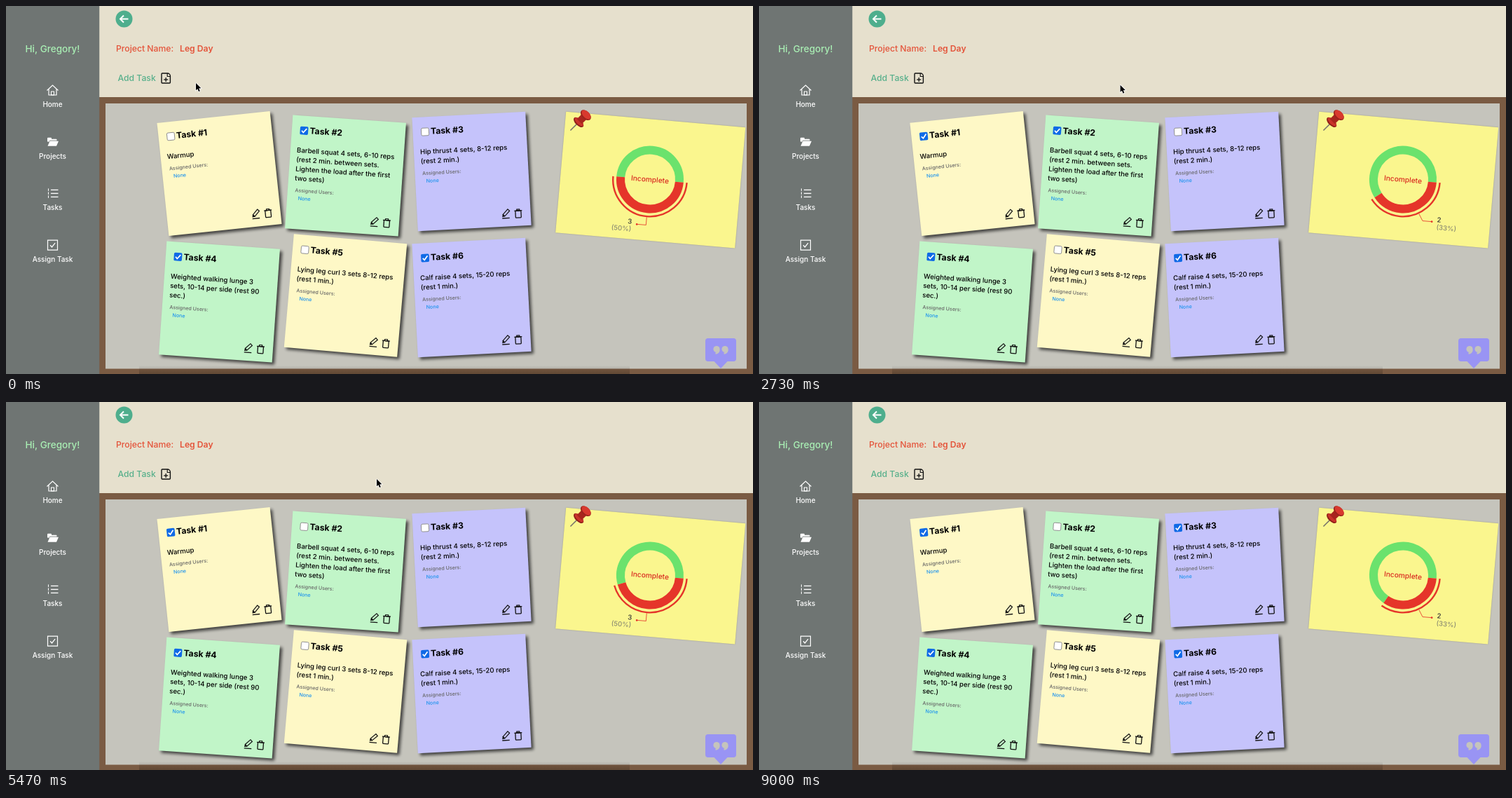
An HTML page with a canvas for the animation above (9.07 s loop, 1066x525 px).

```html
<!DOCTYPE html>
<html lang="en">
<head>
<meta charset="utf-8">
<title>Task board</title>
<style>
  html, body { margin: 0; width: 100%; height: 100%; overflow: hidden; background: #e6e0cd; }
  canvas { display: block; width: 1066px; height: 525px; }
</style>
</head>
<body>
<canvas id="stage" width="1066" height="525"></canvas>
<script>
const ctx = document.getElementById('stage').getContext('2d');
const LOOP = 9070, SIDE = 162, PITCH = 180, GROW = .25, RAD = Math.PI / 180;
const RED = '#e5352a', INK = '#111', BOARD = '#c5c4bc';

const clamp = v => Math.max(0, Math.min(1, v));
const smooth = v => { const u = clamp(v); return u * u * (3 - 2 * u); };
const mix = (a, b, u) => a + (b - a) * u;

// cubic-bezier(.25, .1, .25, 1)
function ease(x) {
  if (x <= 0 || x >= 1) return clamp(x);
  const curve = (a, b, u) => 3 * a * u * (1 - u) ** 2 + 3 * b * u * u * (1 - u) + u ** 3;
  let lo = 0, hi = 1;
  for (let i = 0; i < 22; i++) {
    const mid = (lo + hi) / 2;
    if (curve(.25, .25, mid) < x) lo = mid; else hi = mid;
  }
  return curve(.1, 1, lo);
}

// drawing helpers

function text(str, x, y, size, color, weight = 500, align = 'left', base = 'middle') {
  ctx.font = `${weight} ${size}px Inter, "Open Sans", sans-serif`;
  ctx.fillStyle = color;
  ctx.textAlign = align;
  ctx.textBaseline = base;
  ctx.fillText(str, x, y);
}

function trace(xy) {
  ctx.beginPath();
  for (let i = 0; i < xy.length; i += 2) ctx.lineTo(xy[i], xy[i + 1]);
}

function line(color, width, ...xy) {
  trace(xy);
  ctx.strokeStyle = color;
  ctx.lineWidth = width;
  ctx.stroke();
}

function shape(color, ...xy) {
  trace(xy);
  ctx.fillStyle = color;
  ctx.fill();
}

function rect(color, x, y, w, h, r = 0) {
  ctx.beginPath();
  ctx.roundRect(x, y, w, h, r);
  ctx.fillStyle = color;
  ctx.fill();
}

function frame(color, width, x, y, w, h, r = 0) {
  ctx.beginPath();
  ctx.roundRect(x, y, w, h, r);
  ctx.strokeStyle = color;
  ctx.lineWidth = width;
  ctx.stroke();
}

function oval(color, x, y, rx, ry = rx) {
  ctx.beginPath();
  ctx.ellipse(x, y, rx, ry, 0, 0, 7);
  ctx.fillStyle = color;
  ctx.fill();
}

function arc(color, width, x, y, r, from, to) {
  ctx.beginPath();
  ctx.arc(x, y, r, from * RAD, to * RAD);
  ctx.strokeStyle = color;
  ctx.lineWidth = width;
  ctx.stroke();
}

function at(x, y, turn, scale, draw) {
  ctx.save();
  ctx.translate(x, y);
  ctx.rotate(turn * RAD);
  ctx.scale(scale, scale);
  draw();
  ctx.restore();
}

const tick = (color, width) => line(color, width, -3.4, .2, -1, 2.8, 3.6, -3);

// notes

const YELLOW = { color: '#fef8c6', turn: -6, shift: 0 };
const STYLES = [
  [5, { ...YELLOW, turn: 5, shift: -6 }],
  [3, { color: '#c5c3fb', turn: -3, shift: -3 }],
  [2, { color: '#c1f5c8', turn: 4, shift: 3 }],
  [1, YELLOW]
];

const notes = [
  { body: 'Warmup', visit: [890, 1741, 2582] },
  { body: 'Barbell squat 4 sets, 6-10 reps|(rest 2 min. between sets.|Lighten the load after the first|two sets)',
    done: true, visit: [3400, 4449, 5000] },
  { body: 'Hip thrust 4 sets, 8-12 reps|(rest 2 min.)', visit: [6340, 7200, 7418] },
  { body: 'Weighted walking lunge 3|sets, 10-14 per side (rest 90|sec.)', done: true },
  { body: 'Lying leg curl 3 sets 8-12 reps|(rest 1 min.)' },
  { body: 'Calf raise 4 sets, 15-20 reps|(rest 1 min.)', done: true }
].map(({ body, done = false, visit = [] }, i) => {
  const style = STYLES.find(([step]) => (i + 1) % step === 0)[1];
  const [enter = Infinity, toggle = Infinity, leave = Infinity] = visit;
  return {
    ...style, done, enter, toggle, leave,
    title: `Task #${i + 1}`,
    lines: body.split('|'),
    x: 304.5 + PITCH * (i % 3),
    y: 239 + PITCH * Math.floor(i / 3) + style.shift
  };
});
const visited = notes.filter(n => n.enter < LOOP);

const hovered = (n, t) => t >= n.enter && t < n.leave;

// a toggle rebuilds the note, so its lift starts over
function lift(n, t) {
  if (t < n.enter) return 0;
  if (t >= n.leave) return 1 - clamp((t - n.leave) / 150);
  return clamp((t - (t >= n.toggle ? n.toggle : n.enter)) / 150);
}

function drawCheckbox(on) {
  if (on) {
    rect('#0f6ae6', -5.8, -5.8, 11.6, 11.6, 1.8);
    tick('#fff', 1.7);
  } else {
    rect('#fff', -5.6, -5.6, 11.2, 11.2, 1.8);
    frame('#777', .8, -5.4, -5.4, 10.8, 10.8, 1.8);
  }
}

function drawPencil() {
  at(0, -1, 45, 1, () => {
    frame(INK, 1.2, -1.8, -6.5, 3.6, 10);
    shape(INK, -2.4, 3.5, 2.4, 3.5, 0, 7);
  });
  line(INK, 1.3, -5, 5.8, 5.5, 5.8);
}

function drawBin() {
  line(INK, 1.3, -5.5, -4, 5.5, -4);
  frame(INK, 1.1, -2, -6, 4, 2);
  frame(INK, 1.3, -4, -4, 8, 10, 1);
}

function drawNote(n, t) {
  const p = lift(n, t), scale = 1 + GROW * p;
  at(n.x, n.y, n.turn * (1 - p), scale, () => {
    ctx.shadowColor = 'rgba(20,20,20,.75)';
    ctx.shadowOffsetX = ctx.shadowOffsetY = (hovered(n, t) ? 6 : 3.3) * scale;
    ctx.shadowBlur = 4.2 * scale;
    rect(n.color, -SIDE / 2, -SIDE / 2, SIDE, SIDE);
    ctx.shadowColor = 'transparent';

    at(-63.4, -59.9, 0, 1, () => drawCheckbox(n.done !== (t >= n.toggle)));
    text(n.title, -55.4, -59.8, 12.2, '#000', 700);
    n.lines.forEach((str, k) => text(str, -71.8, -31.2 + k * 13.4, 9.6, '#000'));
    const y = -27.5 + n.lines.length * 13.4;
    text('Assigned Users:', -70.5, y, 7.1, '#666');
    text('None', -65.5, y + 11.2, 7.1, '#1c93ee');
    at(45.2, 63.4, 0, 1, drawPencil);
    at(63.3, 63.4, 0, 1, drawBin);
  });
}

// page

const icons = {
  Home() {
    line('#fff', 1.2, -8, .5, 0, -7, 8, .5);
    line('#fff', 1.2, -5.5, -1.5, -5.5, 7, 5.5, 7, 5.5, -1.5);
    frame('#fff', 1.1, -2, 2, 4, 5);
  },
  Projects() {
    rect('#fff', -7.5, -6, 6, 5, 1);
    rect('#fff', -7.5, -4, 13.5, 4, 1);
    line('#6f7573', 1, -6, 4, -4, -1.5, 7, -1.5);
    shape('#fff', -7, 6, -4, -1, 8.5, -1, 5.5, 6);
  },
  Tasks() {
    for (let y = -5; y <= 5; y += 5) {
      line('#fff', 1.3, -2.5, y, 8, y);
      line('#fff', 1, -6, y - 2, -6, y + 1.5);
    }
  },
  'Assign Task'() {
    frame('#fff', 1.2, -7, -7, 14, 14);
    tick('#fff', 1.3);
  }
};

function drawSidebar() {
  rect('#6f7573', 0, 0, 133.25, 525);
  text('Hi, Gregory!', 66.5, 62, 13.5, '#a9efb4', 500, 'center');
  Object.entries(icons).forEach(([label, icon], i) => {
    const y = 120 + i * 73.7;
    at(66.5, y, 0, 1, icon);
    text(label, 66.5, y + 21, 10, '#fff', 500, 'center');
  });
}

function drawHeader() {
  rect('#e6e0cd', 133, 0, 933, 130);
  at(168.5, 18.5, 0, 1, () => {
    oval('#4eae8d', 0, 0, 12);
    line('#fff', 2, 6, 0, -5, 0);
    line('#fff', 2, -.5, -5, -5.5, 0, -.5, 5);
  });
  text('Project Name:', 157, 61, 12.2, '#e4543a');
  text('Leg Day', 248, 61, 12.2, '#e4543a', 600);
  text('Add Task', 159.5, 103, 12.2, '#59b08c');
  at(228.2, 103, 0, 1, () => {
    frame(INK, 1.4, -6.2, -7, 12.4, 14, [1, 4, 1, 1]);
    line(INK, 1.1, 2, -7, 2, -2.5, 6, -2.5);
    line(INK, 1.3, -3, 2, 3, 2);
    line(INK, 1.3, 0, -1, 0, 5);
  });
}

function drawBoard() {
  rect('#7a5b43', 133, 130, 933, 395);
  rect(BOARD, 142, 139, 915, 378.5);
  const shade = ctx.createLinearGradient(0, 513, 0, 525);
  shade.addColorStop(0, 'rgba(40,30,20,0)');
  shade.addColorStop(1, 'rgba(40,30,20,.3)');
  rect(shade, 190, 513, 700, 12);
}

function drawBubble() {
  const color = '#9994f4';
  rect(color, 998, 474, 44, 33, 4);
  shape(color, 1010, 506.5, 1030, 506.5, 1020, 517);
  for (const x of [1014, 1026]) {
    oval(BOARD, x, 489.5, 4.6);
    arc(BOARD, 2.4, x - 1.5, 490.5, 5, 0, 90);
  }
}

// chart

function chartState(t) {
  let open = notes.filter(n => !n.done).length, sweep = open * 60;
  for (const n of visited) {
    if (t < n.toggle) continue;
    const step = n.done ? 1 : -1;
    open += step;
    sweep += step * 60 * ease((t - n.toggle - 450) / 1500);
  }
  return { open, sweep };
}

function drawPin() {
  at(821, 162, 45, 1, () => {
    line('#77736a', 1.6, 0, 6, 0, 22);
    oval('#8f1f18', 0, 5.5, 9, 4.5);
    oval('#c9332a', 0, 4.5, 8, 3.6);
    rect('#a8261e', -5, -8, 10, 12);
    oval('#9c231c', 0, -9, 9, 5.5);
    oval('#d8392e', 0, -10, 8, 4.6);
  });
}

function drawChart(t) {
  const { open, sweep } = chartState(t);
  at(919.7, 248.2, 5, 1, () => {
    ctx.shadowColor = 'rgba(60,60,30,.35)';
    ctx.shadowBlur = 2;
    rect('#faf68e', -128.5, -86.5, 257, 173);
  });
  drawPin();
  at(919, 247.5, 5, 1, () => {
    arc('#6be26d', 12, 0, 0, 42, sweep, 360);
    arc(RED, 12, 0, 0, 42, 0, sweep);
    arc(RED, 2.4, 0, 0, 52.8, 0, sweep);
    text('Incomplete', 0, .5, 10.2, '#d92b20', 500, 'center');

    const mid = open * 30 * RAD, side = open < 3 ? 1 : -1;
    const c = Math.cos(mid), s = Math.sin(mid);
    const x = 66 * c + side * 13.2, y = 66 * s - .8;
    line(RED, .8, 54 * c, 54 * s, 66 * c, y, x, y);
    oval(RED, x, y, 1.4);
    const label = (str, dy, color) =>
      text(str, x + side * 7.2, y + dy, 9.6, color, 500, side > 0 ? 'left' : 'right', 'alphabetic');
    label(open, 0, '#333');
    label(`(${Math.round(open / 6 * 100)}%)`, 10.8, '#8c8c72');
  });
}

// pointer: rests above the board, dips to a checkbox for each visit

const rests = [271, 529, 529, 606], REST_Y = 110;

function drawPointer(t) {
  if (t > 8600) return;
  const last = visited.length - 1;
  const i = Math.min(last, visited.findIndex(n => t < n.leave + 300) >>> 0);
  const n = visited[i];
  const boxX = n.x - 63.4 * (1 + GROW) + 3, boxY = n.y - 59.9 * (1 + GROW) + 5;
  const near = Math.min(smooth((t - n.enter) / 400 + .45), smooth((n.leave - t) / 400 + .5));
  const x = mix(rests[t < n.toggle ? i : i + 1], boxX, near);
  const y = mix(REST_Y, boxY, near);
  const overText = hovered(n, t) && x - boxX > 8;
  at(x, y, 0, 1, () => {
    if (overText) {
      line('#222', 1, 0, -5.5, 0, 5.5);
      for (const end of [-6, 6]) line('#222', 1, -2.5, end, 2.5, end);
      return;
    }
    const arrow = [0, 0, 0, 10.2, 2.3, 8.2, 4, 12, 5.8, 11.2, 4.2, 7.6, 7.3, 7.3, 0, 0];
    line('#fff', 1.6, ...arrow);
    shape('#000', ...arrow);
  });
}

function draw(t) {
  drawHeader();
  drawBoard();
  drawSidebar();
  const layer = raised => notes.filter(n => hovered(n, t) === raised).forEach(n => drawNote(n, t));
  layer(false);
  drawChart(t);
  drawBubble();
  layer(true);
  drawPointer(t);
}

const start = performance.now();
function loop() {
  draw((performance.now() - start) % LOOP);
  requestAnimationFrame(loop);
}
loop();
</script>
</body>
</html>
```
